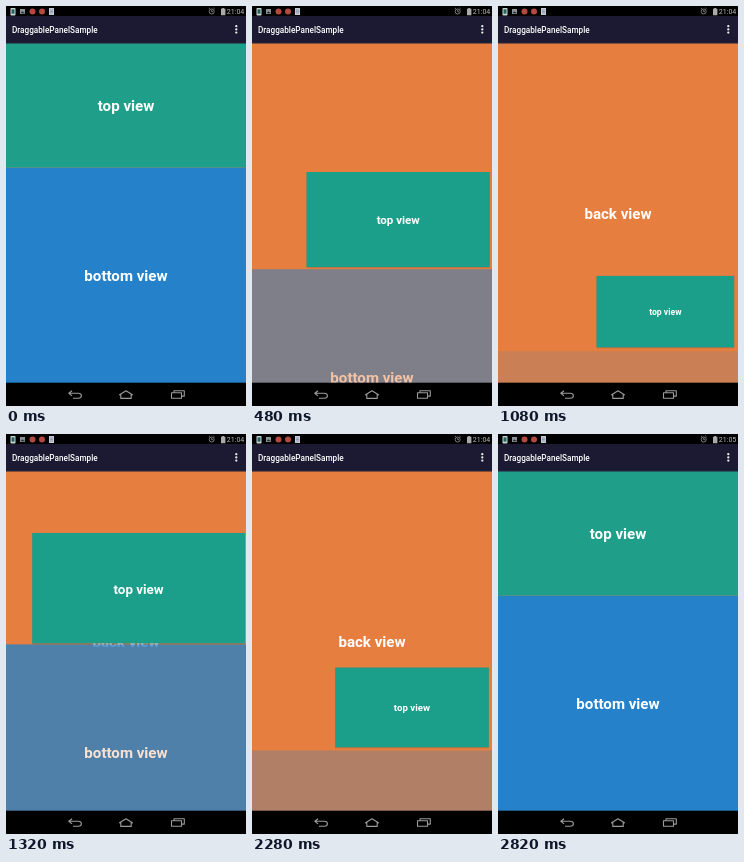
Write an HTML page that moves like this. It is 240 by 400 pixels and loops after 2880 ms.

```html
<!DOCTYPE html>
<html lang="en">
<head>
<meta charset="utf-8">
<title>Draggable panel</title>
<style>
  html, body { margin: 0; width: 100%; height: 100%; overflow: hidden; background: #000; }
  svg { display: block; width: 240px; height: 400px; }
  text { font-family: Roboto, "Open Sans", sans-serif; fill: #fff; }
  .label { font-size: 15.1px; font-weight: 700; text-anchor: middle; }
</style>
</head>
<body>
<svg viewBox="0 0 240 400">
  <defs>
    <filter id="shadow" x="-5%" y="-5%" width="110%" height="112%">
      <feDropShadow dx="0" dy=".6" stdDeviation=".8" flood-color="#402810" flood-opacity=".45"/>
    </filter>
  </defs>

  <rect y="37" width="240" height="340" fill="#e67e40"/>
  <text class="label" x="120" y="212.5">back view</text>

  <g id="bottom">
    <rect width="240" height="216" fill="#2481ca"/>
    <text class="label" x="120" y="113.5">bottom view</text>
  </g>

  <g id="top" filter="url(#shadow)">
    <rect width="240" height="124.5" fill="#1f9f8a"/>
    <text class="label" x="120" y="68.3">top view</text>
  </g>

  <!-- status bar -->
  <rect width="240" height="10" fill="#000"/>
  <rect x="4.5" y="2" width="5" height="7.5" rx=".8" fill="#c9d6d6"/>
  <rect x="5.5" y="3.3" width="3" height="4.4" fill="#27635f"/>
  <rect x="14" y="3" width="5" height="5" fill="#8b9396"/>
  <path d="M14.7 7.3l1.5-2 1.1 1.2.7-.8.7 1.6z" fill="#20282c"/>
  <circle cx="26.5" cy="5.5" r="3" fill="#b5493f"/>
  <circle cx="36" cy="5.5" r="3" fill="#b5493f"/>
  <rect x="43" y="2" width="5" height="7" fill="#c4cbd8"/>
  <path d="M44 4h3M44 5.5h3M44 7h3" stroke="#6d7891" stroke-width=".6"/>
  <g fill="none" stroke="#999" stroke-width=".8">
    <circle cx="205.7" cy="5.5" r="2.5"/>
    <path d="M205.7 4v1.7h1.3M202.8 3l1.2-1.1M208.6 3l-1.2-1.1"/>
  </g>
  <path d="M215 2.8h1.2v-.9h2v.9h1.2v6.5H215z" fill="#aaa"/>
  <text id="clock" x="238.3" y="8.2" text-anchor="end" style="font-size:7px;fill:#bbb"></text>

  <!-- action bar -->
  <rect y="10" width="240" height="27.3" fill="#1c1a32"/>
  <rect y="36.5" width="240" height=".8" fill="#25263f"/>
  <text x="6" y="26.6" font-size="8.2" font-weight="500">DraggablePanelSample</text>
  <g fill="#eee">
    <circle cx="230.3" cy="20.2" r="1.15"/>
    <circle cx="230.3" cy="23.4" r="1.15"/>
    <circle cx="230.3" cy="26.6" r="1.15"/>
  </g>

  <!-- navigation bar -->
  <rect y="376.7" width="240" height="23.3" fill="#000"/>
  <g fill="none" stroke="#9b9b9b" stroke-width="1.1" stroke-linejoin="round">
    <path d="M66 384.7l-3.2 2.6 3.2 2.6M63 387.3h9.2q3.2 0 3.2 2.5t-3.2 2.5H67"/>
    <path d="M113.2 389l6.8-4.3 6.8 4.3M114.8 388.2v4.2h10.4v-4.2"/>
    <path d="M165.5 386.8h10v5.5h-10zM168 386.5v-1.8h10.3v5.4h-2.5"/>
  </g>
</svg>
<script>
const LOOP = 2880, STEP = 60;
const byId = id => document.getElementById(id);
const topView = byId('top'), bottomView = byId('bottom'), clock = byId('clock');

// Drag progress over time: 0 is expanded, 1 is collapsed.
const drag = [
  [0, 0], [120, 0], [480, .4725], [840, .945], [900, 1], [960, 1], [1320, .227],
  [1440, 0], [1500, 0], [1800, .55], [2040, 1], [2160, 1], [2280, .72], [2580, 0], [2880, 0]
];

const slope = i => (drag[i + 1][1] - drag[i][1]) / (drag[i + 1][0] - drag[i][0]);

// Harmonic mean of neighbouring slopes keeps the curve free of overshoot.
function tangent(i) {
  if (i === 0 || i === drag.length - 1) return 0;
  const a = slope(i - 1), b = slope(i);
  return a * b > 0 ? 2 * a * b / (a + b) : 0;
}

function progress(t) {
  const i = drag.findIndex((point, k) => k < drag.length - 1 && t < drag[k + 1][0]);
  const [t0, p0] = drag[i], [t1, p1] = drag[i + 1];
  const span = t1 - t0, u = (t - t0) / span, v = 1 - u;
  return p0 * (1 + 2 * u) * v * v + p1 * u * u * (3 - 2 * u)
    + span * u * v * (tangent(i) * v - tangent(i + 1) * u);
}

function render(t) {
  const p = progress(t);
  const scale = 1 - p / 2, margin = 4.5 * p;
  const x = 240 * (1 - scale) - margin, y = 37 + 273 * p;
  topView.setAttribute('transform', `translate(${x} ${y}) scale(${scale})`);
  topView.style.filter = p > 0 ? '' : 'none';
  bottomView.setAttribute('transform', `translate(0 ${y + 124.5 * scale + margin})`);
  bottomView.setAttribute('opacity', 1 - p);
  clock.textContent = t < 2760 ? '21:04' : '21:05';
}

const start = performance.now();
function tick() {
  const t = (performance.now() - start) % LOOP;
  render(Math.floor(t / STEP) * STEP);
  requestAnimationFrame(tick);
}
tick();
</script>
</body>
</html>
```
